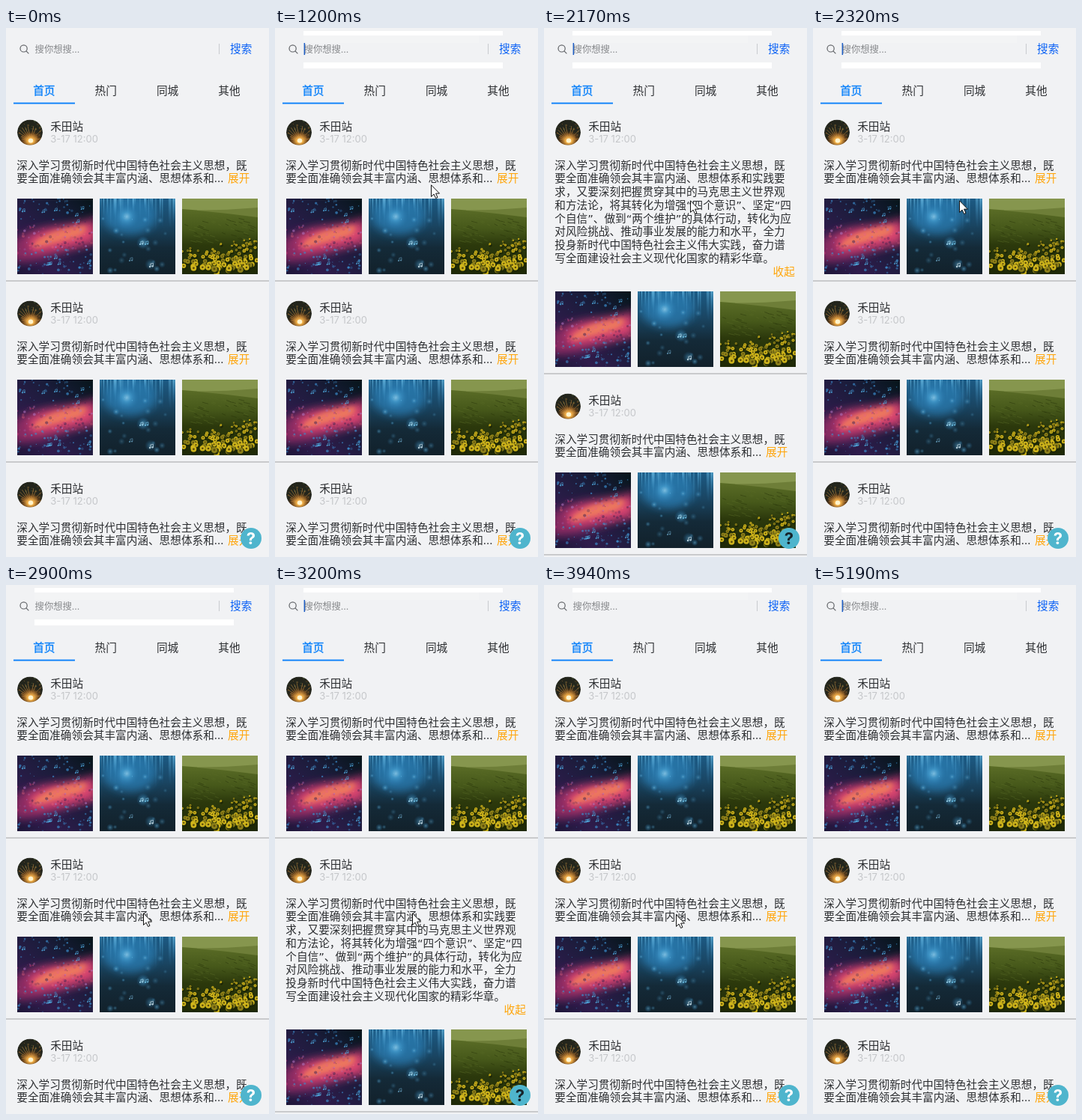
These frames come from a looping animation (351 by 707 pixels, 5.46 s). An HTML page:

```html
<!DOCTYPE html>
<html lang="zh-CN">
<head>
<meta charset="utf-8">
<title>动态列表</title>
<style>
html, body { margin: 0; width: 100%; height: 100%; overflow: hidden; background: #f1f2f4; }
svg { display: block; width: 351px; height: 707px; }
text { font: 14.65px Inter, "Noto Sans CJK SC", sans-serif; fill: #2c2e31; white-space: pre; }
.body { font-family: "DejaVu Sans", "Noto Sans CJK SC", sans-serif; }
.date { font-size: 13px; fill: #c5c7ca; }
.link { fill: #ffa50a; }
.hint { font-size: 12.3px; fill: #85878a; }
.go { fill: #0c62f5; }
.tab { text-anchor: middle; }
.on { fill: #0a80fa; stroke: #0a80fa; stroke-width: .35px; }
.ask { font: bold 22px Inter, sans-serif; text-anchor: middle; }
</style>
</head>
<body>
<svg viewBox="0 0 351 707" xmlns="http://www.w3.org/2000/svg">
  <defs>
    <clipPath id="square"><rect width="101" height="101"/></clipPath>
    <clipPath id="round"><circle r="17"/></clipPath>
    <filter id="soft" x="-50%" y="-50%" width="200%" height="200%"><feGaussianBlur stdDeviation="6"/></filter>
    <filter id="fuzz" x="-50%" y="-50%" width="200%" height="200%"><feGaussianBlur stdDeviation="3"/></filter>
    <linearGradient id="space" x1="1" y1="0" x2="0" y2="1">
      <stop offset="0" stop-color="#06151a"/><stop offset=".35" stop-color="#1a1c3a"/>
      <stop offset=".75" stop-color="#2f1c4c"/><stop offset="1" stop-color="#1d1638"/>
    </linearGradient>
    <linearGradient id="deep" x1="0" y1="0" x2="0" y2="1">
      <stop offset="0" stop-color="#1c5a84"/><stop offset=".35" stop-color="#1a4562"/>
      <stop offset=".65" stop-color="#142a38"/><stop offset="1" stop-color="#12212b"/>
    </linearGradient>
    <linearGradient id="ray" x1="0" y1="0" x2="0" y2="1">
      <stop offset="0" stop-color="#74c8f0"/><stop offset="1" stop-color="#3a90c8" stop-opacity="0"/>
    </linearGradient>
    <radialGradient id="orb">
      <stop offset="0" stop-color="#9cd8f4"/><stop offset=".35" stop-color="#4ba6d8" stop-opacity=".8"/>
      <stop offset="1" stop-color="#2a78b0" stop-opacity="0"/>
    </radialGradient>
    <linearGradient id="hill" x1="0" y1="0" x2="0" y2="1">
      <stop offset="0" stop-color="#5a6c26"/><stop offset=".3" stop-color="#46581a"/>
      <stop offset=".55" stop-color="#2c390c"/><stop offset="1" stop-color="#1e2806"/>
    </linearGradient>
    <radialGradient id="spark">
      <stop offset="0" stop-color="#fff0b8"/><stop offset=".25" stop-color="#f2b048"/>
      <stop offset=".6" stop-color="#8c541e" stop-opacity=".75"/><stop offset="1" stop-color="#4a2c10" stop-opacity="0"/>
    </radialGradient>
    <g id="avatar" clip-path="url(#round)"></g>
    <g id="galaxy" clip-path="url(#square)"></g>
    <g id="rain" clip-path="url(#square)"></g>
    <g id="field" clip-path="url(#square)"></g>
  </defs>
  <rect width="351" height="707" fill="#f1f2f4"/>
  <rect id="tint" x="38" y="10" width="234" height="10" fill="#f3f4f5"/>
  <rect id="strip1" x="38" y="4" height="6" fill="#fff"/>
  <rect id="strip2" y="46" height="8" fill="#fff"/>
  <g fill="none" stroke="#606367" stroke-width="1.2" stroke-linecap="round">
    <circle cx="23.6" cy="27.4" r="4.6"/><path d="M27 30.8L30 33.8"/>
  </g>
  <text class="hint" x="38.6" y="32.6">搜你想搜...</text>
  <rect id="caret" x="38.6" y="20" width="1.5" height="16" fill="#1c5cc4"/>
  <rect x="284" y="21" width="1" height="14" fill="#c9cbcf"/>
  <text class="go" x="299" y="33.4">搜索</text>
  <g id="tabs"></g>
  <rect x="10" y="99.6" width="82" height="1.9" fill="#0a80fa"/>
  <g id="feed"></g>
  <circle cx="327" cy="682" r="14" fill="#4fb5cd"/>
  <text class="ask" id="ask" x="327" y="690">?</text>
  <path id="cursor" d="M.5 .8V16.4L4.1 13.1L6.6 18.5L9 17.4L6.6 12.1H11.5Z" fill="#fff" stroke="#111" stroke-width="1" stroke-linejoin="round"/>
</svg>
<script>
const $ = id => document.getElementById(id);
const LOOP = 5460, PITCH = 242, GROW = 124, LINE = 17.75;

let seed = 7;
const rnd = (a = 0, b = 1) => {
  seed = (seed * 16807) % 2147483647;
  return a + (b - a) * seed / 2147483647;
};
const many = (n, fn) => Array.from({ length: n }, (_, i) => fn(i)).join('');
const dot = (x, y, r, fill, o = 1) =>
  `<circle cx="${x.toFixed(1)}" cy="${y.toFixed(1)}" r="${r.toFixed(1)}" fill="${fill}" opacity="${o.toFixed(2)}"/>`;
const box = fill => `<rect width="101" height="101" fill="${fill}"/>`;
const note = (x, y, c, s = 1) =>
  `<g transform="translate(${x.toFixed(1)} ${y.toFixed(1)}) scale(${s})"><circle r="1.5" fill="${c}"/><circle cx="4.4" cy="-.8" r="1.5" fill="${c}"/><path d="M1.2 0V-5L5.6 -6V-.8" fill="none" stroke="${c}"/></g>`;
const text = (cls, x, y, s) => `<text class="${cls}" x="${x}" y="${y}">${s}</text>`;

$('avatar').innerHTML = '<circle r="17" fill="#23251c"/>' +
  many(34, () => dot(rnd(-16, 16), rnd(-16, 6), rnd(.4, 1.4), rnd() < .5 ? '#4c5c3a' : '#7a5428', .65)) +
  '<ellipse cx="1" cy="11" rx="17" ry="14" fill="url(#spark)"/>' +
  many(15, i => {
    const a = Math.PI * (i + 1) / 16, l = rnd(9, 21);
    return `<path d="M1 11L${(1 + l * Math.cos(a)).toFixed(1)} ${(11 - l * Math.sin(a)).toFixed(1)}" stroke="#e8a850" stroke-width=".7" opacity=".65"/>`;
  }) + '<ellipse cx="1" cy="11" rx="3.2" ry="3" fill="#fff4cc"/>';

$('galaxy').innerHTML = box('url(#space)') +
  `<g filter="url(#soft)">
    <path d="M-5 56Q20 38 50 36T106 24V62Q80 66 50 76T-5 84Z" fill="#8a2a62"/>
    <path d="M16 54Q46 36 104 34V54Q70 66 20 70Z" fill="#d84470"/>
  </g>
  <path filter="url(#fuzz)" d="M20 62Q36 46 60 41T92 36Q94 48 74 53T24 66Z" fill="#f0805c" opacity=".85"/>` +
  many(90, () => {
    const x = rnd(0, 101), y = 58 - x * .14 + rnd(-22, 22);
    return dot(x, y, rnd(.6, 2.2), ['#c83c78', '#5a2458', '#e8647c', '#3a2050'][Math.floor(rnd(0, 4))], rnd(.2, .5));
  }) +
  many(130, () => {
    const x = rnd(0, 101), y = rnd(0, 101), mid = Math.abs(y - 52) < 16;
    return dot(x, y, rnd(.4, 1.9), mid ? '#b074c0' : '#3c8ccc', rnd(.25, .75));
  }) +
  many(12, () => note(rnd(4, 96), rnd() < .5 ? rnd(8, 34) : rnd(78, 98), '#50a8dc', .6));

$('rain').innerHTML = box('url(#deep)') +
  '<ellipse cx="40" cy="22" rx="36" ry="26" fill="#2a7eb4" opacity=".75" filter="url(#soft)"/>' +
  many(44, () => `<rect x="${rnd(0, 101).toFixed(1)}" width="${rnd(.5, 1.7).toFixed(1)}" height="${rnd(10, 44).toFixed(1)}" fill="url(#ray)" opacity="${rnd(.2, .75).toFixed(2)}"/>`) +
  dot(36, 24, 17, 'url(#orb)', .75) + dot(58, 59, 9, 'url(#orb)', .55) + dot(68, 88, 8, 'url(#orb)', .4) +
  many(20, () => dot(rnd(3, 98), rnd(22, 98), rnd(1.5, 5), 'url(#orb)', rnd(.2, .5))) +
  note(54, 61, '#9cd4ec', .7) + note(61, 61, '#6cbce0', .7) + note(67, 91, '#b4ccd8', .8) + note(40, 83, '#5a8ca8', .7);

$('field').innerHTML = box('#86964e') +
  '<path d="M0 15Q40 17 101 12V101H0Z" fill="#6e7e38"/><path d="M0 14Q50 18 101 25V101H0Z" fill="url(#hill)"/>' +
  many(60, () => `<path d="M${rnd(-5, 98).toFixed(1)} ${rnd(24, 60).toFixed(1)}l${rnd(4, 9).toFixed(1)} 2" stroke="${rnd() < .5 ? '#586a26' : '#28340a'}" opacity=".5"/>`) +
  many(120, i => {
    const d = i / 120, x = rnd(0, 101), top = 64 - x * .13;
    const y = top + (100 - top) * Math.min(1, d * .85 + rnd(0, .15)), r = 1.2 + 2.8 * d;
    return dot(x + 1, y + 1.5, r * 1.25, '#1c2606', .8) + dot(x, y, r, rnd() < .6 ? '#d6ba1c' : '#94861a', .95) + dot(x, y, r * .35, '#5a4a0c');
  });

const lines = [
  '深入学习贯彻新时代中国特色社会主义思想,既',
  '要全面准确领会其丰富内涵、思想体系和实践要',
  '求,又要深刻把握贯穿其中的马克思主义世界观',
  '和方法论,将其转化为增强“四个意识”、坚定“四',
  '个自信”、做到“两个维护”的具体行动,转化为应',
  '对风险挑战、推动事业发展的能力和水平,全力',
  '投身新时代中国特色社会主义伟大实践,奋力谱',
  '写全面建设社会主义现代化国家的精彩华章。'
].map(s => s.replace(/,/g, '\uff0c')); // full-width comma

$('tabs').innerHTML = ['首页', '热门', '同城', '其他']
  .map((s, i) => text(i ? 'tab' : 'tab on', 50.8 + i * 82.4, 89.4, s)).join('');

const row = i => text('body', 14.3, 188.6 + i * LINE, lines[i]);
const post = i => `<g id="post${i}">
  <use href="#avatar" x="32" y="139.5"/>
  ${text('', 59.2, 137, '禾田站')}${text('date', 59.2, 153.4, '3-17 12:00')}
  ${row(0)}
  <g id="less${i}">${text('', 14.3, 206.4, lines[1].slice(0, 18) + '...')}${text('link', 296, 206.4, '展开')}</g>
  <g id="more${i}">${many(7, k => row(k + 1))}${text('link', 305.6, 330.6, '收起')}</g>
  <g id="tail${i}">
    <use href="#galaxy" x="15" y="228"/><use href="#rain" x="125" y="228"/><use href="#field" x="235" y="228"/>
    <rect y="337" width="351" height="2" fill="#c9cacc"/>
  </g></g>`;
$('feed').innerHTML = many(3, post);

// time, x, y of the pointer; no position means hidden
const moves = [
  [0], [740, 273, 17], [890, 292, 148], [1040, 275, 179], [1200, 208, 209],
  [1750, 207, 210], [1870, 206, 211], [2020, 195, 230], [2780, 189, 340],
  [2900, 183, 438], [3350, 176, 440], [4080, 178, 324], [4230, 208, 262],
  [4350, 252, 170], [4480, 295, 70], [4610]
];
const blinks = [300, 740, 1200, 1750, 2170, 2640, 3200, 3640, 4230, 4610, 5190];
const opened = [[1470, 2320], [3200, 3940], [0, 0]];

const show = (id, on) => $(id).setAttribute('display', on ? 'inline' : 'none');
const shift = (id, x, y) => $(id).setAttribute('transform', `translate(${x} ${y})`);
const span = (id, from, to) => {
  $(id).setAttribute('x', from);
  $(id).setAttribute('width', to - from);
};

function render(t) {
  show('caret', blinks.filter(b => b <= t).length % 2);

  const [, x, y] = moves.filter(m => m[0] <= t).pop();
  show('cursor', x !== undefined);
  if (x !== undefined) shift('cursor', x, y);

  show('tint', t >= 740);
  show('strip1', t >= 740);
  span('strip1', 38, t < 890 ? 285 : 304);
  show('strip2', t >= 890 && t < 3200);
  span('strip2', t < 1200 ? 273 : 38, 304);

  let top = 0, any = false;
  opened.forEach(([from, to], i) => {
    const open = t >= from && t < to;
    shift('post' + i, 0, top);
    shift('tail' + i, 0, open ? GROW : 0);
    show('less' + i, !open);
    show('more' + i, open);
    top += PITCH + (open ? GROW : 0);
    any = any || open;
  });
  $('ask').style.fill = any ? '#17242a' : '#fff';
}

const start = performance.now();
function tick() {
  render((performance.now() - start) % LOOP);
  requestAnimationFrame(tick);
}
tick();
</script>
</body>
</html>
```
